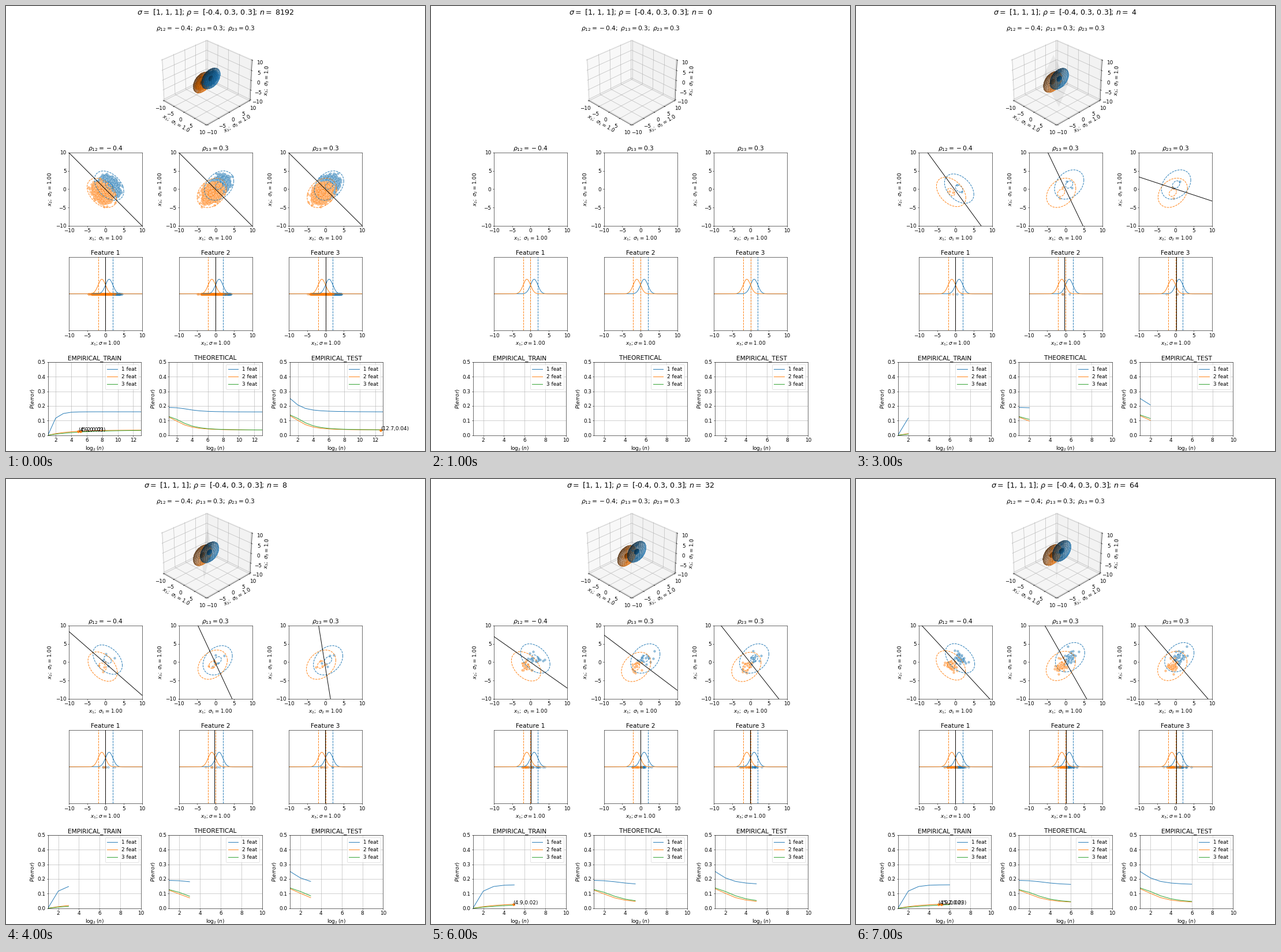
Write a matplotlib script that moves like this. It is 726 px wide and 771 px high and loops after 8 s.

```python
import numpy as np
import matplotlib.pyplot as plt
from matplotlib.animation import FuncAnimation
from matplotlib.colors import to_rgb

W, H, DPI = 726, 771, 48
K = 45.375 / DPI  # point sizes are given for a 16 inch wide page
BLUE, ORANGE, GREEN = "tab:blue", "tab:orange", "tab:green"

plt.rcParams.update({
    "font.family": "DejaVu Sans",
    "font.size": 14 * K,
    "axes.titlepad": 6 * K,
    "axes.labelpad": 4 * K,
    "axes.linewidth": 0.9 * K,
    "grid.linewidth": 0.9 * K,
    "lines.linewidth": 1.5 * K,
    "xtick.major.size": 3.5 * K, "ytick.major.size": 3.5 * K,
    "xtick.major.pad": 3.5 * K, "ytick.major.pad": 3.5 * K,
    "xtick.major.width": 0.9 * K, "ytick.major.width": 0.9 * K,
})

RHO = {(0, 1): -0.4, (0, 2): 0.3, (1, 2): 0.3}
PAIRS = list(RHO)
COV = np.eye(3)
for (i, j), r in RHO.items():
    COV[i, j] = COV[j, i] = r
ROOT = np.linalg.cholesky(COV)
COUNTS = [8192, 0] + [2 ** k for k in range(1, 7)]


def rise(limit, rest):
    """Climb from 0 at k = 1, with the gap to the limit shrinking by a fixed ratio."""
    return lambda k: limit * (1 - rest ** (k - 1))


def fall(limit, gap, half, power):
    """Sink to the limit, with half of the gap left at k = half."""
    return lambda k: limit + gap / (1 + (k / half) ** power)


ERRORS = {
    "EMPIRICAL_TRAIN": (rise(0.16, 0.27), rise(0.035, 0.68), rise(0.035, 0.79)),
    "THEORETICAL": (fall(0.159, 0.031, 3.7, 4), fall(0.035, 0.095, 2.5, 2.8),
                    fall(0.035, 0.096, 2.95, 3)),
    "EMPIRICAL_TEST": (fall(0.159, 0.115, 1.75, 2.5), fall(0.036, 0.105, 2.4, 2.9),
                       fall(0.036, 0.108, 2.8, 2.9)),
}
# panel, log2(n) and error of the marked crossings
CROSSINGS = (("EMPIRICAL_TRAIN", 4.9, 0.0245), ("EMPIRICAL_TRAIN", 5.2, 0.0255),
             ("EMPIRICAL_TEST", 12.7, 0.036))

fig = plt.figure(figsize=(W / DPI, H / DPI), dpi=DPI, facecolor="white")


def add_axes(left, top, w, h, **kw):
    return fig.add_axes([left / W, 1 - (top + h) / H, w / W, h / H], **kw)


def add_square(col, top):
    return add_axes(108.9 + 190.6 * col, top, 127, 127)


def make_space():
    ax = add_axes(260.9, 46.5, 169.2, 169.2, projection="3d", azim=-45, elev=30,
                  computed_zorder=False)
    edge = 10 * 25 / 24
    ax.set(xlim=(-edge, edge), ylim=(-edge, edge), zlim=(-edge, edge))
    for i, axis in enumerate((ax.xaxis, ax.yaxis, ax.zaxis), 1):
        axis.set_ticks(range(-10, 11, 5))
        axis.labelpad = 25 * K - 21
        axis.set_tick_params(pad=11.5 * K - 8)
        axis.set_label_text(rf"$x_{i};\ \sigma_{i}=1.0$")
    parts = [rf"\rho_{{{i + 1}{j + 1}}}={r}" for (i, j), r in RHO.items()]
    ax.set_title("$" + r";\ ".join(parts) + "$", pad=7 * K)
    return ax


def make_plane(col, pair):
    i, j = pair
    ax = add_square(col, 253.9)
    ax.set(xlim=(-10, 10), ylim=(-10, 10),
           xticks=range(-10, 11, 5), yticks=range(-10, 11, 5),
           xlabel=rf"$x_{i + 1};\ \sigma_{i + 1}=1.00$",
           ylabel=rf"$x_{j + 1};\ \sigma_{j + 1}=1.00$",
           title=rf"$\rho_{{{i + 1}{j + 1}}}={RHO[pair]}$")
    return ax


def make_feature(col):
    ax = add_square(col, 435.2)
    ax.set(xlim=(-10, 10), ylim=(-1, 1), xticks=range(-10, 11, 5), yticks=[],
           xlabel=rf"$x_{col + 1}; \sigma=1.00$", title=f"Feature {col + 1}")
    x = np.linspace(-10, 10, 400)
    for mu, c in ((1, BLUE), (-1, ORANGE)):
        ax.plot(x, np.exp(-(x - mu) ** 2 / 2) / np.sqrt(2 * np.pi), color=c)
        for edge in (mu - 1, mu + 1):
            ax.axvline(edge, color=c, ls="--")
    return ax


def make_error(col, name):
    ax = add_axes(72.6 + 209.73 * col, 616.7, 161.33, 127)
    ax.set(ylim=(0, 0.5), title=name, xlabel=r"$\log_2(n)$", ylabel="$P(error)$",
           yticks=np.arange(0, 0.51, 0.1))
    ax.grid(True)
    curves = [ax.plot([], [], color=c, label=f"{i} feat")[0]
              for i, c in enumerate((BLUE, ORANGE, GREEN), 1)]
    ax.legend(loc="upper right")
    return ax, curves


space = make_space()
planes = [make_plane(c, p) for c, p in enumerate(PAIRS)]
features = [make_feature(c) for c in range(3)]
errors = {name: make_error(c, name) for c, name in enumerate(ERRORS)}
head = fig.text(0.5, 1 - 15.4 / H, "", fontsize=20 * K, ha="center", va="baseline")
live = []

t = np.linspace(0, 2 * np.pi, 121)
CIRCLE = np.array([np.cos(t), np.sin(t)])
a, b = np.meshgrid(np.linspace(0, 2 * np.pi, 25), np.linspace(0, np.pi, 25))
SPHERE = np.array([np.cos(a) * np.sin(b), np.sin(a) * np.sin(b), np.cos(b)])


def dots(ax, x, y, c, face):
    live.append(ax.scatter(x, y, s=32 * K * K, facecolor=[face],
                           edgecolor=[(*to_rgb(c), 0.45)], linewidth=K))


def draw_solid(pts, c):
    live.append(space.scatter(*pts.T, s=20 * K * K, color=c, alpha=0.25))
    for size in (1, 4):
        xyz = np.einsum("ij,jkl->ikl", ROOT, SPHERE * size)
        xyz += pts.mean(axis=0)[:, None, None]
        live.append(space.plot_surface(*xyz, color=c, alpha=0.2, rstride=1, cstride=1,
                                       linewidth=0, antialiased=False))


def draw_flat(pts, c):
    mean, rgb = pts.mean(axis=0), to_rgb(c)
    pale = tuple(1 - 0.45 * (1 - v) for v in rgb)
    for ax, (i, j) in zip(planes, PAIRS):
        dots(ax, pts[:, i], pts[:, j], c, pale)
        root = np.linalg.cholesky(COV[np.ix_([i, j], [i, j])])
        for size in (1, 4):
            x, y = size * root @ CIRCLE
            live.extend(ax.plot(x + mean[i], y + mean[j], "--", color=c))
    for i, ax in enumerate(features):
        dots(ax, pts[:, i], np.zeros(len(pts)), c, (*rgb, 0.3))


def draw_wall(diff, mid):
    """Separating plane, spanned by the viewing direction h and the height z."""
    w = np.linalg.solve(COV, diff)
    h, z = np.meshgrid([-7.5, 7.5], [-7.5, 7.5])
    wu, wh = (w[0] + w[1]) / np.sqrt(2), (w[0] - w[1]) / np.sqrt(2)
    u = (w @ mid - wh * h - w[2] * z) / wu
    live.append(space.plot_surface((u + h) / np.sqrt(2), (u - h) / np.sqrt(2), z,
                                   color="black", alpha=0.06, shade=False, linewidth=0))


def draw_borders(blue, orange, diff, mid):
    spread = sum((p - p.mean(axis=0)).T @ (p - p.mean(axis=0)) for p in (blue, orange))
    spread += 4 * COV  # keeps tiny samples solvable
    for ax, pair in zip(planes, PAIRS):
        pick = list(pair)
        w = np.linalg.solve(spread[np.ix_(pick, pick)], diff[pick])
        way = 40 * np.array([-w[1], w[0]]) / np.hypot(*w)
        ends = np.array([mid[pick] - way, mid[pick] + way])
        live.extend(ax.plot(*ends.T, color="black"))
    for ax, cut in zip(features, mid):
        live.append(ax.axvline(cut, color="black"))


def draw_errors(n):
    last = int(np.log2(n)) if n else 0
    k = np.arange(1, last + 1)
    for name, (ax, curves) in errors.items():
        ax.set_xlim(1, max(10, last))
        ax.set_xticks(range(2, max(10, last) + 1, 2))
        for curve, rule in zip(curves, ERRORS[name]):
            curve.set_data(k, rule(k))
    for name, x, y in CROSSINGS:
        if x <= last:
            ax = errors[name][0]
            live.extend(ax.plot(x, y, "o", color=ORANGE, ms=6 * K, mew=K))
            live.append(ax.text(x, y, f"({x},{y:.2f})"))


def update(frame):
    while live:
        live.pop().remove()
    n = COUNTS[frame]
    head.set_text(rf"$\sigma=$ [1, 1, 1]; $\rho=$ [-0.4, 0.3, 0.3]; $n=$ {n}")
    draw_errors(n)
    if n:
        rng = np.random.default_rng(n)
        blue, orange = (rng.standard_normal((n // 2, 3)) @ ROOT.T + mu for mu in (1, -1))
        diff = blue.mean(axis=0) - orange.mean(axis=0)
        mid = (blue.mean(axis=0) + orange.mean(axis=0)) / 2
        draw_wall(diff, mid)
        draw_solid(orange, ORANGE)
        draw_solid(blue, BLUE)
        draw_flat(blue, BLUE)
        draw_flat(orange, ORANGE)
        draw_borders(blue, orange, diff, mid)
    return live


anim = FuncAnimation(fig, update, frames=len(COUNTS), interval=1000, repeat=True)
plt.show()
```
